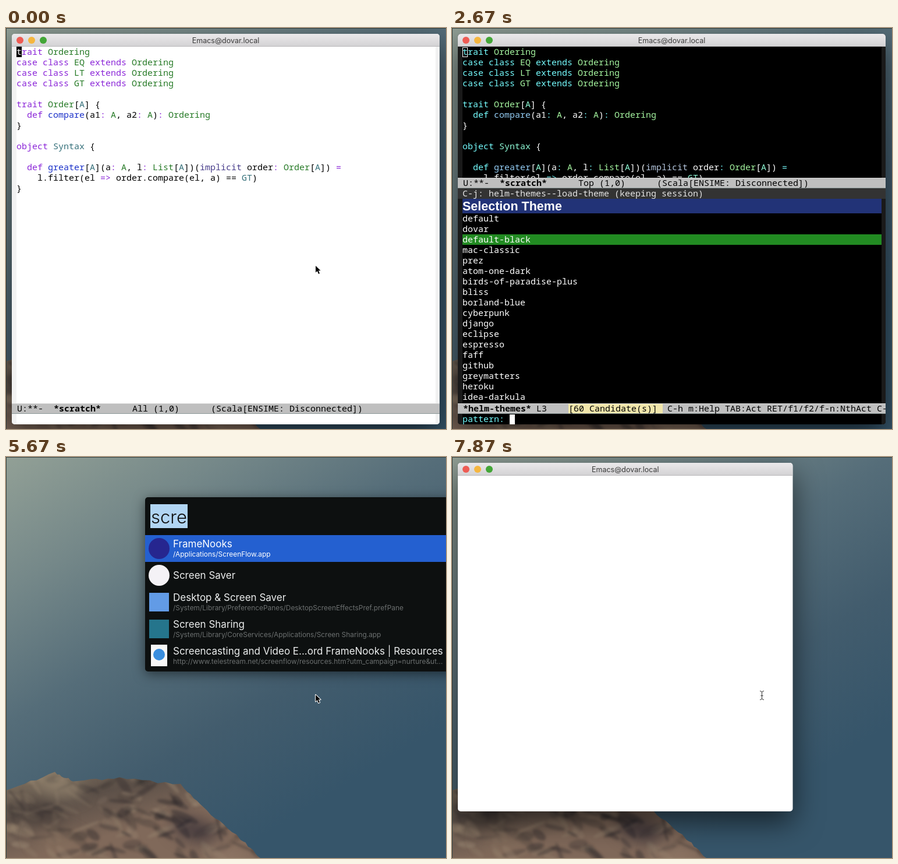
Recreate the animation shown at these times as an HTML page with a canvas. Size 756 by 688 pixels, loop 8 s.

```html
<!DOCTYPE html>
<html lang="en">
<head>
<meta charset="utf-8">
<title>Switching editor themes</title>
<style>
html, body { margin: 0; width: 756px; height: 688px; overflow: hidden; background: #4c6672; }
canvas { display: block; }
</style>
</head>
<body>
<canvas id="stage" width="756" height="688"></canvas>
<script>
const stage = document.getElementById('stage');
const c = stage.getContext('2d');
const LOOP = 8000, ROW = 18, COL = 9;
const MONO = '500 15px "Noto Sans Mono", monospace';
const BOLD = 'bold 15px "Noto Sans Mono", monospace';
const sans = (size, weight = 400) => `${weight} ${size}px Inter, sans-serif`;

const LIGHT = {
  bg: '#fff', fg: '#000', fringe: '#f2f2f2', k: '#8b26d8', t: '#267a26', f: '#1a30c8', c: '#35707a', b: '#483d8b',
  prompt: '#1a2cae', head: '#e5e5e5', headText: '#333', source: '#aed1f0', sourceText: '#000', pick: '#bbfbce'
};
const DARK = {
  bg: '#000', fg: '#fff', fringe: '#1a1a1a', k: '#75fbfd', t: '#a5f5a0', f: '#94cdf5', c: '#8ffad6', b: '#b5c6de',
  prompt: '#75fbfd', head: '#333', headText: '#e5e5e5', source: '#223377', sourceText: '#fff', pick: '#228b22'
};

const CODE = `trait Ordering
case class EQ extends Ordering
case class LT extends Ordering
case class GT extends Ordering

trait Order[A] {
  def compare(a1: A, a2: A): Ordering
}

object Syntax {

  def greater[A](a: A, l: List[A])(implicit order: Order[A]) =
    l.filter(el => order.compare(el, a) == GT)
}`.split('\n');
const TOKEN = /(?<k>\b(?:trait|case class|extends|def|object)\b|=>|:| =$)|(?<f>(?<=def )\w+)|(?<c>(?<=\[)A|Syntax|GT(?=\)))|(?<b>implicit)|(?<t>[A-Z]\w*)/g;

const THEMES = ('default dovar default-black mac-classic prez atom-one-dark birds-of-paradise-plus bliss ' +
  'borland-blue cyberpunk django eclipse espresso faff github greymatters heroku idea-darkula').split(' ');

// Each result: title, subtitle, icon colour, icon shape
const SCREEN = [
  ['FrameNooks', '/Applications/ScreenFlow.app', '#26268f', 'circle'],
  ['Screen Saver', '', '#f4f2f6', 'circle'],
  ['Desktop & Screen Saver', '/System/Library/PreferencePanes/DesktopScreenEffectsPref.prefPane', '#629be6', 'square'],
  ['Screen Sharing', '/System/Library/CoreServices/Applications/Screen Sharing.app', '#25758c', 'square'],
  ['Screencasting and Video E...ord FrameNooks | Resources',
    'http://www.telestream.net/screenflow/resources.htm?utm_campaign=nurture&ut...', '#3a8ede', 'page']
];
const EDITOR = [
  ['Emacs', '/Applications/Emacs.app', '#7650b0', 'circle'],
  ...['emacs.d', 'emacs-themes', 'emacs-notes.org', 'emacs-init.el', 'emacs-keys.txt', 'emacs-build', 'emacs-helm', 'emacs-scala']
    .map(name => [name, '~/Documents/' + name, '#629be6', 'square'])
];

// How many of n evenly timed steps have begun since time at
const steps = (t, at, n, gap = 70) => Math.max(0, Math.min(n, Math.floor((t - at) / gap) + 1));

function rect(x, y, w, h, color) {
  c.fillStyle = color;
  c.fillRect(x, y, w, h);
}

function text(s, x, y, color, font = MONO) {
  c.font = font;
  c.fillStyle = color;
  c.fillText(s, x, y);
}

function circle(x, y, r, color) {
  c.fillStyle = color;
  c.beginPath();
  c.arc(x, y, r, 0, 7);
  c.fill();
}

// Colours spread evenly along a line
function gradient(x, y, x2, y2, ...colors) {
  const g = c.createLinearGradient(x, y, x2, y2);
  colors.forEach((color, i) => g.addColorStop(i / (colors.length - 1), color));
  return g;
}

function seeded(seed) {
  return () => (seed = seed * 16807 % 2147483647) / 2147483647;
}

function paintWallpaper() {
  const canvas = document.createElement('canvas');
  canvas.width = stage.width;
  canvas.height = stage.height;
  const g = canvas.getContext('2d'), rand = seeded(77);
  g.fillStyle = gradient(0, 0, 410, 670, '#92a096', '#758889', '#556d79', '#425c6d', '#36556a');
  g.fillRect(0, 0, 756, 688);

  // Rugged ridge through a few key points
  const ridge = [[0, 574], [84, 541], [115, 556], [195, 551], [300, 562], [345, 608], [403, 655], [437, 688]];
  g.beginPath();
  g.moveTo(0, 688);
  ridge.slice(1).forEach(([x, y], i) => {
    const [px, py] = ridge[i];
    for (let k = 0; k < 1; k += .125) g.lineTo(px + (x - px) * k, py + (y - py) * k + rand() * 4 - 2);
  });
  g.lineTo(437, 688);
  g.fillStyle = gradient(0, 545, 40, 688, '#817361', '#5c5048', '#80695a');
  g.fill();
  g.save();
  g.clip();

  // Soft creases slant down to the right and darken that way
  g.filter = 'blur(2px)';
  for (let i = 0; i < 170; i++) {
    const x = rand() * 437, y = 545 + rand() * 143;
    const lit = rand() > .35 + x / 900;
    g.fillStyle = lit ? '#9d8a74' : '#2b2729';
    g.globalAlpha = .15 + rand() * .3;
    g.beginPath();
    g.ellipse(x, y, 8 + rand() * 20, 2 + rand() * 6, rand() * 2 - .6, 0, 7);
    g.fill();
  }
  g.filter = 'blur(14px)';
  g.globalAlpha = .65;
  for (const [x, y, color] of [[60, 615, '#3a3230'], [325, 640, '#25232e'], [90, 562, '#a3937a'], [90, 660, '#87705f'], [385, 688, '#967d6b']]) {
    g.fillStyle = color;
    g.beginPath();
    g.ellipse(x, y, 42, 18, .3, 0, 7);
    g.fill();
  }
  g.restore();
  g.strokeStyle = '#33413f';
  g.strokeRect(.5, .5, 800, 800);
  return canvas;
}

// Window with its title bar; spread scales the shadow
function frame(w, h, body, spread, active = true) {
  box(10, 10, w, h, body, 50 * spread, 18 * spread, .6 * spread);
  c.save();
  c.beginPath();
  c.roundRect(10, 10, w, h, 5);
  c.clip();
  rect(10, 10, w, 22, active ? gradient(0, 10, 0, 32, '#ebe9eb', '#d2d1d3') : '#f4f4f4');
  rect(10, 31, w, 1, '#b8b7b9');
  c.restore();
  ['#ee5c54', '#f5b63f', '#43a637'].forEach((color, i) => circle(24 + 20 * i, 21, 6, active ? color : '#d5d5d5'));
  c.textAlign = 'center';
  text('Emacs@dovar.local', 10 + w / 2, 25.5, active ? '#3b3b3b' : '#a0a0a0', sans(12.5));
  c.textAlign = 'left';
}

// Rounded box that casts a shadow
function box(x, y, w, h, color, blur, drop, alpha) {
  c.save();
  c.shadowColor = `rgba(0,0,0,${alpha})`;
  c.shadowBlur = blur;
  c.shadowOffsetY = drop;
  c.fillStyle = color;
  c.beginPath();
  c.roundRect(x, y, w, h, 5);
  c.fill();
  c.restore();
}

function code(theme) {
  CODE.forEach((line, row) => {
    const y = 46 + row * ROW;
    let at = 0;
    const put = (s, color) => { text(s, 18 + at * COL, y, color); at += s.length; };
    for (const m of line.matchAll(TOKEN)) {
      put(line.slice(at, m.index), theme.fg);
      put(m[0], theme[Object.keys(m.groups).find(k => m.groups[k])]);
    }
    put(line.slice(at), theme.fg);
  });
}

// Parts are [column, text, font]
function modeLine(y, parts) {
  rect(10, y, 735, 18, '#bfbfbf');
  rect(10, y, 735, 1, '#d4d4d4');
  rect(10, y + 17, 735, 1, '#8c9898');
  for (const [col, s, font] of parts) text(s, 19 + col * COL, y + 14, '#000', font);
}

const scratchLine = (y, place) => modeLine(y, [
  [0, 'U:**-'], [7, '*scratch*', BOLD], [22, place + ' (1,0)'], [37, '(Scala[ENSIME: Disconnected])']
]);

function helm(theme, picked) {
  rect(10, 257, 735, 423, theme.fringe);
  rect(18, 257, 720, 423, theme.bg);
  scratchLine(257, 'Top');
  rect(10, 275, 735, 18, theme.head);
  text('C-j: helm-themes--load-theme (keeping session)', 18, 289, theme.headText);
  rect(18, 293, 720, 25, theme.source);
  text('Selection Theme', 18, 313, theme.sourceText, 'bold 21.5px "Liberation Sans", sans-serif');
  rect(18, 318 + picked * ROW, 720, ROW, theme.pick);
  THEMES.forEach((name, i) => text(name, 18, 332 + i * ROW, theme.fg));
  modeLine(644, [[0, '*helm-themes*', BOLD], [14, 'L' + (picked + 1)], [39, 'C-h m:Help TAB:Act RET/f1/f2/f-n:NthAct C-']]);
  rect(200, 645, 162, 16, '#f1e6ab');
  text('[60 Candidate(s)]', 200, 658, '#000');
  prompt(theme, 'pattern: ', true);
}

function prompt(theme, s, cursor) {
  text(s, 18, 676, theme.prompt);
  if (cursor) rect(18 + s.length * COL, 663, COL, 17, theme.fg);
}

function editor(t) {
  const theme = t < 2670 ? LIGHT : DARK;
  const helmOpen = t >= 1130 && t < 3600;
  const asking = steps(t, 3800, 2);
  frame(735, 670, theme.bg, 1);
  c.save();
  c.beginPath();
  c.roundRect(10, 10, 735, 670, 5);
  c.clip();
  rect(10, 32, 8, 648, theme.fringe);
  rect(738, 32, 7, 648, theme.fringe);
  code(theme);
  if (helmOpen || asking) {
    c.strokeStyle = theme.fg;
    c.strokeRect(18.5, 33.5, 8, 16);
  } else {
    rect(18, 32, COL, 18, theme.fg);
    text('t', 18, 46, theme.bg);
  }
  if (helmOpen) {
    helm(theme, steps(t, 2000, 2, 130));
  } else {
    scratchLine(644, 'All');
    if (asking) prompt(theme, 'Really exit Emacs? (y or n) ', asking === 2);
  }
  c.restore();
}

function icon(y, color, shape) {
  if (shape === 'circle') circle(263, y + 23, 18, color);
  else if (shape === 'square') rect(246, y + 7, 34, 32, color);
  else {
    rect(249, y + 4, 28, 37, '#f7f7f7');
    circle(263, y + 21, 10, color);
  }
}

function launcher(t) {
  const typed = steps(t, 5930, 3);
  const results = typed ? EDITOR : SCREEN;
  c.globalAlpha = steps(t, 5530, 3) / 3;
  box(239, 69, 540, 69 + results.length * 46, '#0d1010', 20, 4, .5);
  if (typed) {
    const query = 'ema'.slice(0, typed);
    text(query, 249, 114, '#fff', sans(31, 300));
    rect(251 + c.measureText(query).width, 84, 1, 36, '#fff');
  } else {
    rect(248, 81, 64, 41, '#b1d5f3');
    text('scre', 249, 114, '#111', sans(31, 300));
  }
  rect(239, 134, 517, 46, '#2460d0');
  results.forEach(([title, path, color, shape], i) => {
    const y = 134 + i * 46;
    icon(y, color, shape);
    text(title, 287, y + (path ? 21 : 29), i ? '#eceeee' : '#fff', sans(17));
    text(path, 287, y + 37, i ? '#6c7070' : '#fff', sans(11.9));
  });
  c.globalAlpha = 1;
}

function newWindow(t) {
  const focus = steps(t, 7730, 3) / 3;
  c.globalAlpha = steps(t, 7000, 2) / 2;
  frame(575.5, 598, '#fff', .6 + .4 * focus, focus > 0);
  c.globalAlpha = 1;
}

function pointer() {
  const arrow = new Path2D('M532 408v11.5l2.8-2.5 2.2 5 2-1-2.2-4.7h3.7z');
  c.save();
  c.lineJoin = 'round';
  c.lineWidth = 2;
  c.strokeStyle = '#fff';
  c.fillStyle = '#000';
  c.stroke(arrow);
  c.fill(arrow);
  c.restore();
}

function beam() {
  c.strokeStyle = '#333';
  c.beginPath();
  for (const x of [529, 536]) {
    c.moveTo(x, 401.5);
    c.quadraticCurveTo(532.5, 401.5, 532.5, 404);
    c.lineTo(532.5, 414);
    c.quadraticCurveTo(532.5, 416.5, x, 416.5);
  }
  c.moveTo(530.5, 409.5);
  c.lineTo(534.5, 409.5);
  c.stroke();
}

const wallpaper = paintWallpaper();

function draw(t) {
  c.drawImage(wallpaper, 0, 0);
  if (t < 4800) editor(t);
  if (t >= 5530 && t < 6470) launcher(t);
  if (t >= 7000) newWindow(t);
  if (t >= 7730) beam();
  else if (t < 1130 || t >= 4800) pointer();
}

const start = performance.now();
function tick() {
  draw((performance.now() - start) % LOOP);
  requestAnimationFrame(tick);
}
tick();
</script>
</body>
</html>
```
